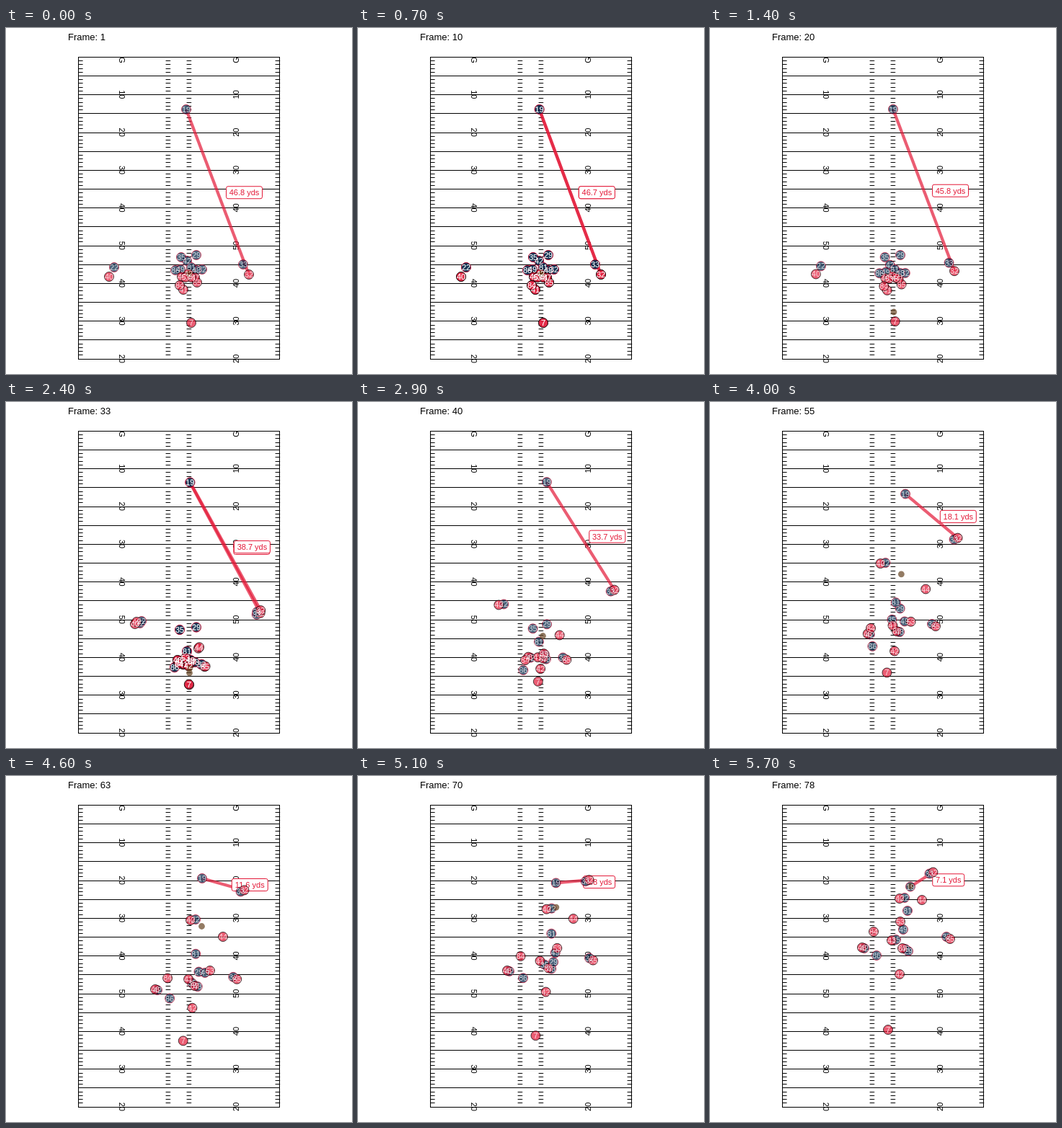
These frames come from a looping animation (480 px wide and 480 px high, 7.8 s). An HTML page:

```html
<!DOCTYPE html>
<html lang="en">
<head>
<meta charset="utf-8">
<title>Punt coverage</title>
<style>
  html, body { margin: 0; width: 100%; height: 100%; overflow: hidden; background: #fff; }
  svg { display: block; width: 480px; height: 480px; font: 11px "Liberation Sans", Arial, sans-serif; }
  .field path { stroke: #000; fill: none; }
  .mid { text-anchor: middle; }
</style>
</head>
<body>
<svg viewBox="0 0 480 480">
  <g class="field" id="field"></g>
  <text id="title" x="86" y="17" font-size="13"></text>
  <g id="play"></g>
</svg>
<script>
const STEP = 100, LOOP = 7800, LAST = 57, STATES = 78;
const YARD = 5.235, LEFT = 100, RIGHT = 379, TOP = 40.35;
const SNAP = 15.5, KICK = 33.5;
const NAVY = { fill: '#002244', edge: '#C60C30', men: [] };
const RED = { fill: '#E31837', edge: '#000', men: [] };
const teams = [NAVY, RED];
const $ = id => document.getElementById(id);

// Field: a line every 5 yards, short marks on each yard, numbers every 10
function drawField() {
  let d = `M${LEFT}.5 40V460M${RIGHT}.5 40V460`;
  for (let k = 0; k <= 80; k++) {
    const y = Math.floor(TOP + k * YARD) + 0.5;
    if (k % 5 === 0) d += `M${LEFT} ${y}H${RIGHT + 1}`;
    else for (const x of [LEFT, 221.6, 250.6, 373.6]) d += `M${x} ${y}h6.6`;
  }
  const label = (s, x, y, turn) =>
    `<text class="mid" transform="translate(${x} ${y}) rotate(${turn})" y="4">${s}</text>`;
  let out = `<path d="${d}"/>`;
  ['G', 10, 20, 30, 40, 50, 40, 30, 20].forEach((s, i) => {
    const y = 40 + i * 10 * YARD + (i ? 0 : 4.5);
    out += label(s, 160.5, y, 90) + label(s, 318.5, y, -90);
  });
  $('field').innerHTML = out;
}

// Smooth curve through (ts, vs), starting from rest
function curve(ts, vs) {
  const n = ts.length - 1;
  const tan = ts.map((_, i) => {
    const b = Math.min(i + 1, n);
    return i ? (vs[b] - vs[i - 1]) / (ts[b] - ts[i - 1]) : 0;
  });
  return s => {
    const t = Math.max(s, ts[0]);
    let i = 0;
    while (i < n - 1 && t > ts[i + 1]) i++;
    const h = ts[i + 1] - ts[i], u = (t - ts[i]) / h, w = 1 - u;
    return vs[i] * (1 + 2 * u) * w * w + tan[i] * h * u * w * w
      + vs[i + 1] * u * u * (3 - 2 * u) - tan[i + 1] * h * u * u * w;
  };
}

function route(ts, pts) {
  const x = curve(ts, pts.filter((_, i) => i % 2 === 0));
  const y = curve(ts, pts.filter((_, i) => i % 2 === 1));
  return s => [x(s), y(s)];
}

function add(team, num, at) {
  const man = { num, at };
  team.men.push(man);
  return man;
}

// Stand until the snap, then pass the points; straight runs need one fewer
const run = (team, num, ...pts) => add(team, num,
  route(pts.length > 8 ? [SNAP, KICK, 47, 63, 78] : [SNAP, KICK, 47, 78], pts));

// Start at one offset from an opponent, then stay beside him at another
const block = (num, man, dx, dy, nearX, nearY) => add(NAVY, num, s => {
  const u = Math.min(1, Math.max(0, (s - SNAP) / (KICK - SNAP)));
  const e = u * u * (3 - 2 * u), [x, y] = man.at(s);
  return [x + dx + (nearX - dx) * e, y + dy + (nearY - dy) * e];
});

const gunner = run(RED, 32, 337,342, 353,291, 354,225, 330.5,158.4, 309.5,133.5);
const wide = run(RED, 40, 143,345, 180,306.5, 213,252, 256,200, 263,170);
const wing = run(RED, 46, 244,345, 238,358, 232,342, 207,296, 211,238);
const end = run(RED, 85, 265,353, 276,367, 304,338, 333,226);
const guard = run(RED, 87, 262,346, 258,360, 257,342, 267,239);
run(RED, 7, 257,409, 254,392, 246,383, 247,352);
run(RED, 41, 246,363, 246,364, 253,336, 252,228);
run(RED, 42, 253,341, 253,366, 254,365, 263,275);
run(RED, 44, 257,346, 267.5,341, 293,296, 301,223, 294,172);
run(RED, 53, 249,346, 249,355, 269,334, 283,270, 264,202);
run(RED, 84, 241,357, 240,363, 224,343, 227,216);

const returner = add(NAVY, 19, route([1, 20, KICK, 47, 63, 78],
  [250,112.9, 254,112.7, 255.3,111.5, 269,114, 272,142, 278,153.5]));
block(22, wide, 7, -13, 7, -1);
block(33, gunner, -8, -14, -5, 2);
block(32, end, 7, -18, -5, -3);
block(42, wing, 7, -22, 3, 1);
block(48, guard, 2, -10, 4, 1);
run(NAVY, 29, 264,315, 264,312.5, 261,300, 275,243);
run(NAVY, 35, 243,318, 241,316, 246,310, 258,287, 258,227);
run(NAVY, 49, 242,335, 256,358, 262,332, 276,273, 268,213);
run(NAVY, 81, 257,332, 251,346, 253,308, 274,187);
run(NAVY, 86, 235,336, 234,368, 225,364, 231,249);

const ball = route([16, 20, 30, 47, 63, 78],
  [254,341, 255,394, 254,392, 259.5,275.5, 271.5,208.5, 278,153]);

const lineOf = s => {
  const [x1, y1] = returner.at(s), [x2, y2] = gunner.at(s);
  return `<path d="M${x1} ${y1}L${x2} ${y2}" stroke="${RED.fill}" stroke-width="4.2" opacity=".7"/>`;
};

const tagOf = s => {
  const [x1, y1] = returner.at(s), [x2, y2] = gunner.at(s);
  const yds = (Math.hypot(x2 - x1, y2 - y1) / 5.2375).toFixed(1);
  const x = (x1 + x2) / 2 + 37, y = (y1 + y2) / 2 + 0.8;
  const w = yds.length > 3 ? 50 : 44;
  return `<rect x="${x - w / 2}" y="${y - 8.5}" width="${w}" height="17" rx="2.5" fill="#fff" stroke="${RED.fill}"/>
    <text class="mid" x="${x}" y="${y + 4}" fill="${RED.fill}">${yds} yds</text>`;
};

const eachMan = f => teams.map(t => t.men.map(m => f(m, t)).join('')).join('');

const dotsOf = s => eachMan((m, t) => {
  const [x, y] = m.at(s);
  return `<circle cx="${x}" cy="${y}" r="6.5" fill="${t.fill}" stroke="${t.edge}" fill-opacity=".7" stroke-opacity=".7"/>`;
});

const ballOf = s => {
  const [x, y] = ball(s);
  return `<circle cx="${x}" cy="${y}" r="4.4" fill="#654321" opacity=".7"/>`;
};

const numsOf = s => eachMan(m => {
  const [x, y] = m.at(s);
  return `<text class="mid" x="${x}" y="${y + 4}" fill="#fff" opacity=".75">${m.num}</text>`;
});

const layers = [lineOf, tagOf, dotsOf, ballOf, numsOf];

// Tracking states outnumber the ticks, so some ticks show two states at once
function draw(tick) {
  const states = [];
  for (let s = 1; s <= STATES; s++)
    if (Math.round((s - 1) * LAST / (STATES - 1)) === tick) states.push(s);
  $('title').textContent = 'Frame: ' + Math.round(1 + tick * (STATES - 1) / LAST);
  $('play').innerHTML = layers.map(f => states.map(f).join('')).join('');
}

let shown = -1;
function loop(now) {
  const tick = Math.min(LAST, Math.floor((now % LOOP) / STEP));
  if (tick !== shown) draw(shown = tick);
  requestAnimationFrame(loop);
}

drawField();
loop(0);
</script>
</body>
</html>
```
